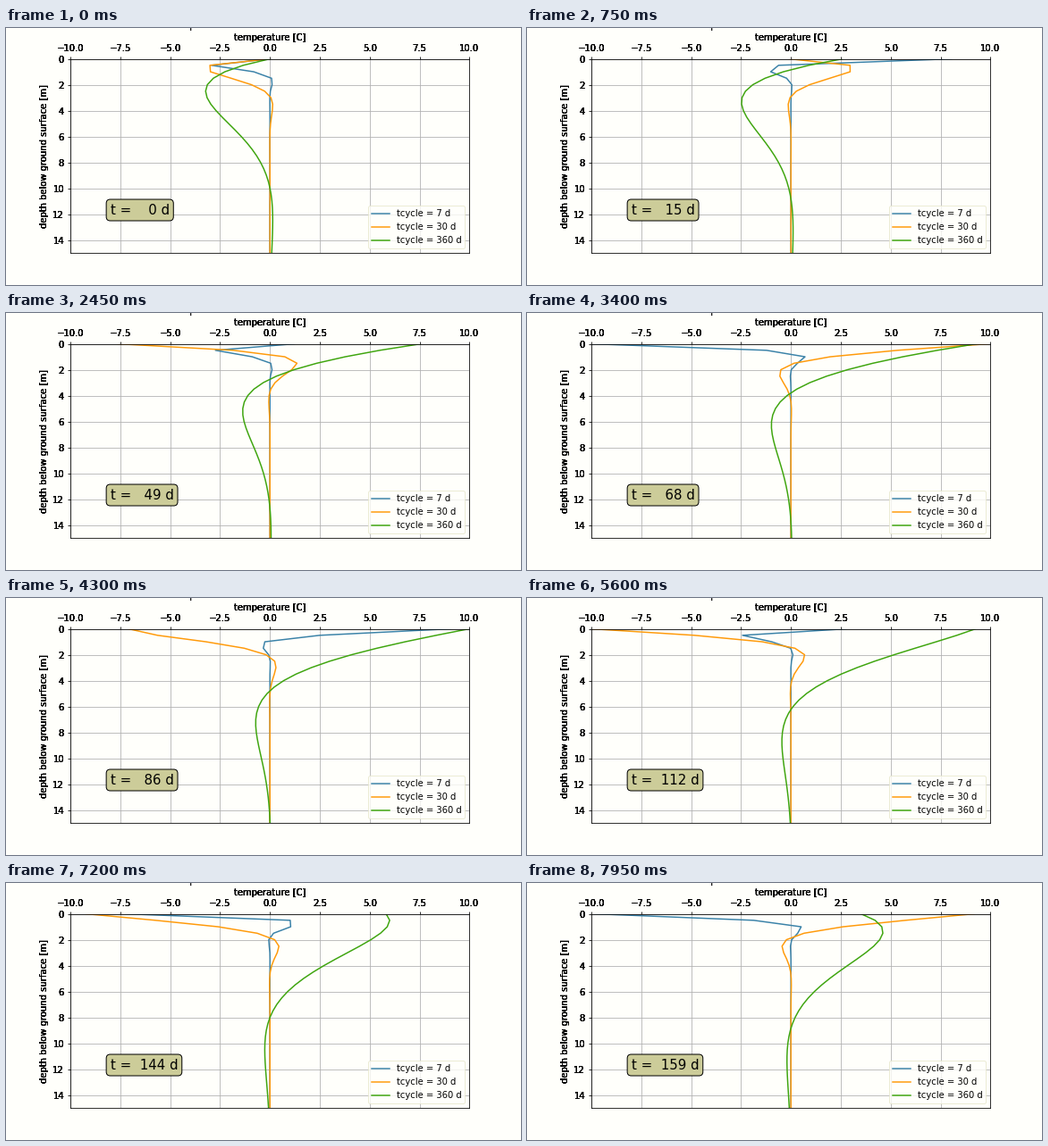
Animation of 576 by 288 pixels, one loop 8000 ms. Source, as a matplotlib script:

```python
import numpy as np
import matplotlib.pyplot as plt
from matplotlib.animation import FuncAnimation

plt.rcParams["font.family"] = "DejaVu Sans"
plt.rcParams["font.size"] = 10

PAPER = "#fffffb"
FRAMES, INTERVAL = 160, 50
STEP = 360 / 359              # days per frame
DIFFUSIVITY = 1.02e-6 * 86400  # m2 per day
AMPLITUDE = 10
CYCLES = {7: "#3a82a8", 30: "#ff9a0a", 360: "#3fa50f"}

depth = np.linspace(0, 15, 31)


def temperature(t, cycle):
    """Damped, delayed surface wave below the ground."""
    x = depth / np.sqrt(DIFFUSIVITY * cycle / np.pi)
    return AMPLITUDE * np.exp(-x) * np.sin(2 * np.pi * t / cycle - x)


def embolden(label, times=5):
    """Draw a label again on top of itself to harden its edges."""
    for _ in range(times):
        fig.text(*label.get_position(), label.get_text(),
                 transform=label.get_transform(), fontsize=label.get_fontsize(),
                 ha=label.get_ha(), va=label.get_va(),
                 rotation=label.get_rotation(),
                 rotation_mode=label.get_rotation_mode())


fig = plt.figure(figsize=(8, 4), dpi=72, facecolor=PAPER)
ax = fig.add_axes([0.125, 0.125, 0.775, 0.755], facecolor=PAPER)
ax.set_xlim(-10, 10)
ax.set_ylim(15, 0)
ax.set_xticks(np.arange(-10, 10.1, 2.5))
ax.set_yticks(range(0, 15, 2))
ax.xaxis.tick_top()
ax.xaxis.set_label_position("top")
ax.set_xlabel("temperature [C]")
ax.set_ylabel("depth below ground surface [m]")
ax.grid(True, color="#b0b0b0", lw=0.8)

lines = {c: ax.plot([], [], color=color, lw=1.5, label=f"tcycle = {c} d")[0]
         for c, color in CYCLES.items()}
ax.legend(loc="lower right", facecolor=PAPER, edgecolor="#e6e6cc")
clock = ax.text(-8, 12, "", fontsize=15,
                bbox=dict(boxstyle="round", facecolor="#cccc99",
                          edgecolor="black"))

# Only the tail of the heading reaches into the stage
fig.text(205 / 576, 1, "p", fontsize=12, va="baseline")

fig.canvas.draw()
for label in [*ax.get_xticklabels(), *ax.get_yticklabels(),
              ax.xaxis.label, ax.yaxis.label]:
    embolden(label)


def update(i):
    t = i * STEP
    for cycle, line in lines.items():
        line.set_data(temperature(t, cycle), depth)
    clock.set_text(f"t = {int(t):4d} d")
    return [*lines.values(), clock]


anim = FuncAnimation(fig, update, frames=FRAMES, interval=INTERVAL,
                     init_func=lambda: update(0), repeat=True, repeat_delay=0)
plt.show()
```
